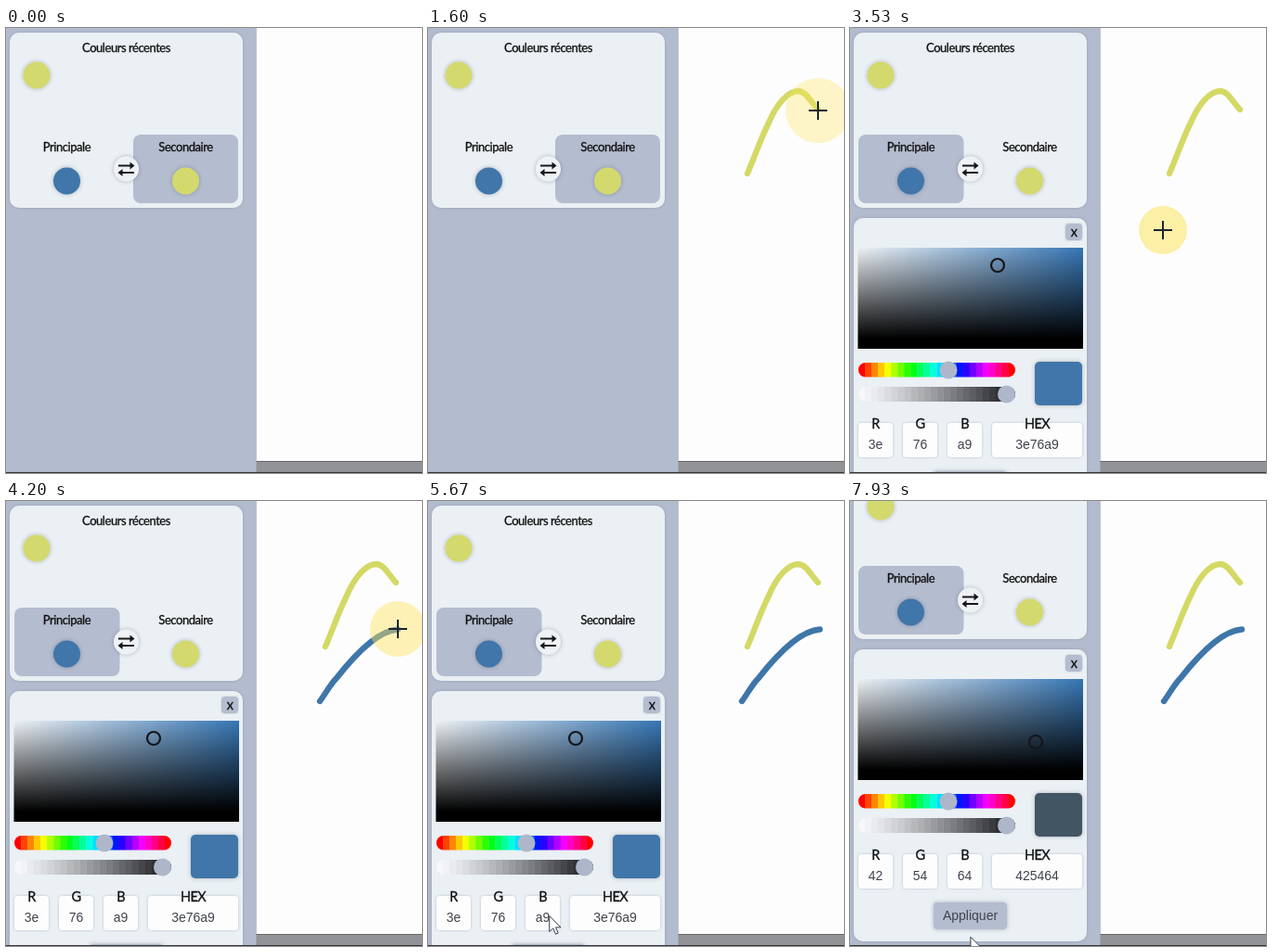
An HTML page for the animation above (8 s loop, 448x480 px).

```html
<!DOCTYPE html>
<html lang="fr">
<head>
<meta charset="utf-8">
<title>Sélecteur de couleurs</title>
<style>
html, body { margin: 0; width: 100%; height: 100%; overflow: hidden; background: #b3bbce; }
svg { display: block; width: 448px; height: 480px; }
text { text-anchor: middle; }
.label { font: 13px Lato, sans-serif; letter-spacing: -.45px; fill: #111; stroke: #111; stroke-width: .3px; }
.big { font-size: 14.5px; letter-spacing: -.7px; }
.value { font: 14px "Liberation Sans", Arial, sans-serif; fill: #40434a; }
</style>
</head>
<body>
<svg viewBox="0 0 448 480">
  <defs>
    <linearGradient id="tint"><stop stop-color="#eef1f4"/><stop offset="1" stop-color="#3676b4"/></linearGradient>
    <linearGradient id="shade" x2="0" y2="1"><stop stop-opacity="0"/><stop offset=".9" stop-opacity="1"/></linearGradient>
    <filter id="soft" x="-30%" y="-30%" width="160%" height="160%"><feDropShadow dx="0" dy="0" stdDeviation="2.2" flood-color="#38435a" flood-opacity=".38"/></filter>
    <filter id="faint" x="-5%" y="-5%" width="110%" height="110%"><feDropShadow dx="0" dy="0" stdDeviation="1.5" flood-color="#5a6680" flood-opacity=".35"/></filter>
    <clipPath id="hueClip"><rect x="9" y="361" width="169" height="15.5" rx="7.7"/></clipPath>
    <clipPath id="alphaClip"><rect x="9" y="387" width="169" height="16" rx="8"/></clipPath>
  </defs>
  <rect width="448" height="480" fill="#b3bbce"/>
  <g id="page"></g>
  <rect x="269.5" width="179" height="480" fill="#929396"/>
  <rect x="269.5" width="179" height="468" fill="#67686c"/>
  <rect x="269.5" width="179" height="467" fill="#fdfdfe"/>
  <g fill="none" stroke-width="6.3" stroke-linecap="round" stroke-linejoin="round">
    <path id="yellow" stroke="#d3d964" d="M344 157C351 141 358 120 367 102C376 81 388 68 399 68C408 69 412 80 420 88"/>
    <path id="blue" stroke="#3f76a9" d="M338 216C344 208 349 198 356 191C374 168 399 140 422 138.500"/>
  </g>
  <rect y="479" width="448" height="1" fill="#35373c"/>
  <circle id="hoverRing" r="7" fill="none" stroke="#a2a6ab" stroke-width="2.2"/>
  <circle id="halo" fill="#fce25a"/>
  <g id="cursor">
    <path id="cross" d="M-10 0H10M0 -10V10" stroke="#1c2436" stroke-width="2"/>
    <path id="arrow" d="M0 0V17L4 13.400L6.800 19.700L9.500 18.500L6.800 12.400H12.300Z" fill="#fff" stroke="#333a48" stroke-width="1"/>
    <path id="hand" d="M-1.800 .800Q0 -1 1.800 .800V7Q4 5.600 5.200 7.600Q7.400 6.500 8.500 8.700Q11 8 11.200 10.500V14.500Q11 17.500 9 19V21.500H-1V19.500Q-4 17 -6 12.500Q-6.600 9.600 -4.200 10.300L-1.800 13Z" fill="#fff" stroke="#2b2f38" stroke-width="1"/>
  </g>
</svg>
<script>
const $ = id => document.getElementById(id);
const LOOP = 8000, SCROLL = 45;
const BLUE = '#4076a9', YELLOW = '#d3d96c', ACCENT = '#b4bccf', CARD = '#eaf0f3';

const rect = (x, y, w, h, r, fill, more = '') =>
  `<rect x="${x}" y="${y}" width="${w}" height="${h}" rx="${r}" fill="${fill}" ${more}/>`;
const disk = (x, y, r, fill, more = '') =>
  `<circle cx="${x}" cy="${y}" r="${r}" fill="${fill}" ${more}/>`;
const text = (x, y, s, cls, id = '') => `<text x="${x}" y="${y}" class="${cls}" id="${id}">${s}</text>`;
const soft = 'filter="url(#soft)"', faint = 'filter="url(#faint)"';

const STEPS = 24;
function strip(y, clip, color) {
  const w = 169 / STEPS;
  let s = '';
  for (let i = 0; i < STEPS; i++) s += rect(9 + i * w, y, w + .3, 16, 0, color(i / (STEPS - 1)));
  return `<g clip-path="url(#${clip})">${s}</g>`;
}

function field(x, w, name, id) {
  const c = x + w / 2;
  return rect(x, 426, w, 37, 4, '#fdfdfe', faint) + text(c, 432, name, 'label big') + text(c, 454, '', 'value', id);
}

const topCard =
  rect(4, 5, 251, 189, 10, CARD, faint) +
  text(129.5, 26, 'Couleurs récentes', 'label') +
  disk(33, 51, 14.5, YELLOW, soft) +
  rect(9, 115, 113.5, 74, 8, ACCENT, 'id="mainBox"') +
  rect(137, 115, 113, 74, 8, ACCENT, 'id="secondBox"') +
  text(65.5, 133, 'Principale', 'label') + text(193.5, 133, 'Secondaire', 'label') +
  disk(65.5, 165, 14.5, BLUE, soft) + disk(193.5, 165, 14.5, YELLOW, soft) +
  disk(129.5, 152, 13.5, '#eff2f5', soft) +
  '<path d="M121 148.500H135M138 156H124" stroke="#15171b" stroke-width="2"/>' +
  '<path d="M133.500 144.500L138.500 148.500L133.500 152.500ZM125.500 152L120.500 156L125.500 160Z" fill="#15171b"/>';

const panel =
  rect(4, 205, 251, 315, 10, CARD, faint) +
  rect(232, 211, 18, 18, 4, ACCENT, faint) + text(241, 224.5, 'x', 'label big') +
  rect(8.5, 237, 242.5, 109, 0, 'url(#tint)') + rect(8.5, 237, 242.5, 109, 0, 'url(#shade)') +
  '<circle id="picker" r="7" fill="none" stroke="#14161a" stroke-width="2.2"/>' +
  strip(361, 'hueClip', p => `hsl(${p * 360},100%,50%)`) +
  strip(387, 'alphaClip', p => { const v = 246 - 222 * p ** 1.2; return `rgb(${v},${v + 1},${v + 4})`; }) +
  disk(106, 369, 9.5, '#aeb7ca') + disk(168.5, 395, 9.5, '#aeb7ca') +
  rect(199, 360, 51, 47, 5, BLUE, `id="swatch" ${soft}`) +
  field(9, 37, 'R', 'red') + field(57, 37, 'G', 'green') + field(105, 37, 'B', 'bleu') + field(153, 97, 'HEX', 'hex') +
  text(167.500, 454, '#', 'value', 'hash') +
  rect(90, 478, 79, 29, 4, ACCENT, soft) + text(129.5, 497, 'Appliquer', 'value');

$('page').innerHTML = topCard + `<g id="panel">${panel}</g>`;

const clamp = v => Math.max(0, Math.min(1, v));
const span = (t, a, b) => clamp((t - a) / (b - a));
const ease = p => p * p * (3 - 2 * p);
const show = (id, on) => $(id).setAttribute('visibility', on ? 'visible' : 'hidden');
const set = (id, attrs) => { for (const k in attrs) $(id).setAttribute(k, attrs[k]); };

// Pointer stops: time, x, y
const stops = [
  [0, 128, 512], [90, 132, 492], [420, 245, 285], [780, 343, 157], [910, 343, 157],
  [1440, 420, 89], [1800, 420, 89], [2450, 68, 157], [2780, 68, 157], [3400, 337, 218],
  [3670, 337, 218], [4130, 422, 138], [4370, 422, 138], [4830, 222, 172], [5070, 147, 290],
  [5320, 146, 345], [5620, 132, 440], [5900, 134, 440], [6330, 200, 261], [7130, 200, 261],
  [7930, 130, 470], [8000, 129, 474]
];
// Button press and release times
const presses = [[880, 1440], [2470, 2560], [3440, 4130], [6640, 6730]];
const lines = [['yellow', 910, 1440], ['blue', 3670, 4130]]
  .map(([id, a, b]) => ({ id, a, b, len: $(id).getTotalLength() }));

function slope(i, k) {
  const p = stops[i - 1], c = stops[i], n = stops[i + 1];
  if (!p || !n || p[1] === c[1] || n[1] === c[1]) return 0;
  return (n[k] - p[k]) / (n[0] - p[0]);
}

function pointer(t) {
  for (const { id, a, b, len } of lines)
    if (t >= a && t < b) {
      const p = $(id).getPointAtLength(len * ease(span(t, a, b)));
      return [p.x, p.y];
    }
  let i = 0;
  while (i < stops.length - 2 && t >= stops[i + 1][0]) i++;
  const A = stops[i], B = stops[i + 1], d = B[0] - A[0], u = (t - A[0]) / d;
  return [1, 2].map(k => {
    const e = ease(u), m = u * (1 - u) * (1 - u), n = u * u * (u - 1);
    return A[k] + (B[k] - A[k]) * e + d * (m * slope(i, k) + n * slope(i + 1, k));
  });
}

function drawHalo(t, x, y) {
  const hit = presses.find(([a, b]) => t >= a && t < b + 320);
  show('halo', hit);
  if (!hit) return;
  const out = span(t, hit[1], hit[1] + 320);
  const r = 26 * span(t, hit[0], hit[0] + 85) + 18 * out;
  set('halo', { cx: x, cy: y, r, opacity: .53 * (1 - .75 * out) });
}

function draw(t) {
  const [x, y] = pointer(t);
  const open = ease(span(t, 2600, 2860));
  const scroll = SCROLL * ease(span(t, 5720, 5900));
  const py = y + scroll;
  const picked = t >= 6640;
  const inside = (l, top, r, b) => x >= l && x <= r && py >= top && py <= b;

  set('page', { transform: `translate(0 ${-scroll})` });
  set('panel', { transform: `translate(0 ${205 * (1 - open)}) scale(1 ${open})` });
  show('panel', open > 0);
  set('mainBox', { opacity: Math.max(open, span(t, 2330, 2480)) });
  const hover = .35 * span(t, 4680, 4800) * (1 - span(t, 4860, 5110));
  set('secondBox', { opacity: Math.max(1 - open, hover) });

  const inField = open === 1 && inside(8, 237, 251, 346);
  show('hash', inField);
  show('hoverRing', inField);
  set('hoverRing', { cx: x, cy: y - 1.5 });
  set('picker', { cx: picked ? 200 : 159, cy: picked ? 305 : 256 });
  set('swatch', { fill: picked ? '#425464' : BLUE });
  const code = picked ? '425464' : '3e76a9';
  $('hex').textContent = code;
  ['red', 'green', 'bleu'].forEach((id, i) => { $(id).textContent = code.substr(i * 2, 2); });

  for (const { id, a, b, len } of lines) {
    const done = len * ease(span(t, a, b));
    set(id, { 'stroke-dasharray': `${done} ${len + 20}` });
    show(id, t >= a);
  }

  drawHalo(t, x, y);
  const onCanvas = x > 269;
  const onButton = inField || inside(9, 115, 250, 189) || open === 1 && inside(90, 478, 169, 507);
  show('cross', onCanvas);
  show('hand', !onCanvas && onButton);
  show('arrow', !onCanvas && !onButton);
  set('cursor', { transform: `translate(${x} ${y})` });
}

function tick(now) {
  draw(now % LOOP);
  requestAnimationFrame(tick);
}
draw(0);
requestAnimationFrame(tick);
</script>
</body>
</html>
```
